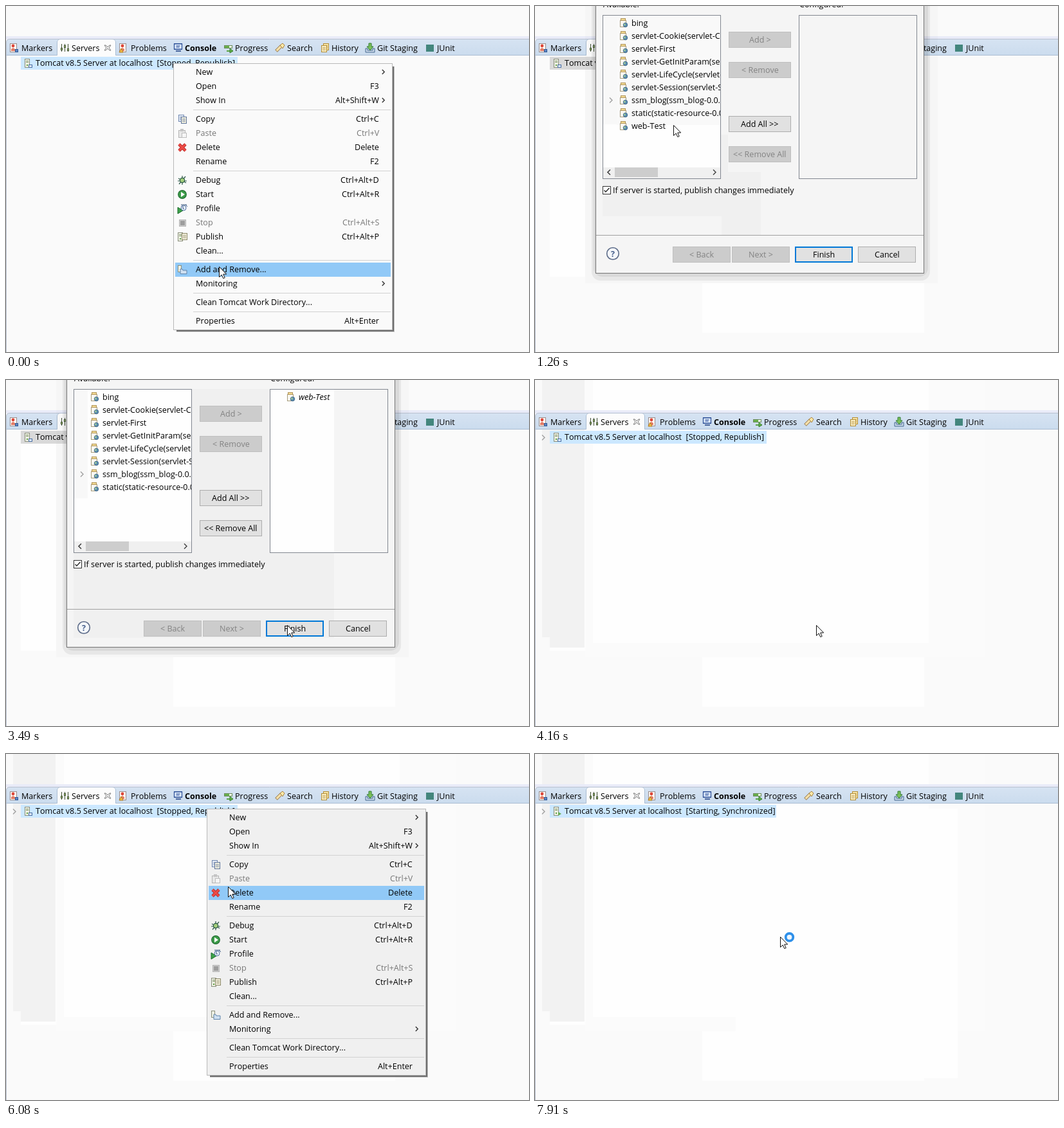
These frames come from a looping animation (813 px wide and 538 px high, 8 s). An HTML page with a canvas:

```html
<!DOCTYPE html>
<html lang="en">
<head>
<meta charset="utf-8">
<title>Server start demo</title>
<style>
html, body { margin: 0; height: 100%; overflow: hidden; background: #fafafa; }
canvas { display: block; }
</style>
</head>
<body>
<canvas id="stage" width="813" height="538"></canvas>
<script>
const ctx = document.getElementById('stage').getContext('2d');
const LOOP = 8000;
const FACE = '12.55px "Open Sans", "Noto Sans", sans-serif';
ctx.fontKerning = 'none';

// ---- drawing helpers ----
function rect(x, y, w, h, fill, stroke) {
  if (fill) { ctx.fillStyle = fill; ctx.fillRect(x, y, w, h); }
  if (stroke) { ctx.strokeStyle = stroke; ctx.lineWidth = 1; ctx.strokeRect(x + .5, y + .5, w - 1, h - 1); }
}
function path(d, x, y, fill, stroke, width = 1) {
  ctx.save();
  ctx.translate(x, y);
  const p = new Path2D(d);
  if (fill) { ctx.fillStyle = fill; ctx.fill(p); }
  if (stroke) { ctx.strokeStyle = stroke; ctx.lineWidth = width; ctx.stroke(p); }
  ctx.restore();
}
function disc(x, y, r, fill, stroke, width = 1) {
  ctx.beginPath();
  ctx.arc(x, y, r, 0, 7);
  if (fill) { ctx.fillStyle = fill; ctx.fill(); }
  if (stroke) { ctx.strokeStyle = stroke; ctx.lineWidth = width; ctx.stroke(); }
}
function text(s, x, midY, color = '#000', align = 'left', style = '') {
  ctx.font = style + ' ' + FACE;
  ctx.fillStyle = color;
  ctx.textAlign = align;
  const left = align === 'left' ? x : x - ctx.measureText(s).width / (align === 'center' ? 2 : 1);
  ctx.textAlign = 'left';
  ctx.fillText(s, Math.round(left), Math.floor(midY) + 5);
}
const chevron = (x, y, color = '#a0a0a0', s = 1) =>
  path(`M${-2 * s} ${-4 * s}L${2 * s} 0L${-2 * s} ${4 * s}`, x, y, null, color, 1.4);

// ---- icons, drawn around their centre ----
const page = (x, y, fill, edge) => {
  rect(x, y, 9, 11, fill, edge);
  path('M2 3.5H7M2 5.5H7M2 7.5H7', x, y, null, edge, .7);
};
const tower = (x, y) => {
  rect(x, y, 8, 14, '#eef0e4', '#8a8f7c');
  path('M2 3.5H6M2 5.5H6', x, y, null, '#7f9468');
  rect(x + 3, y + 9, 2, 2, '#5aa03c');
};
const marker = (x, y, badge) => {
  rect(x - 6, y - 7, 11, 14, '#fdfaf6', '#9c8c8a');
  disc(x - 1, y - 3, 2.4, '#dd4638');
  path('M-4 5V2L-1 0L2 2V5Z', x, y, '#e27c66');
  badge(x, y);
};
const icons = {
  markers: (x, y) => marker(x, y, () => rect(x + 2, y + 2, 5, 5, '#5d86c2', '#315a98')),
  problems: (x, y) => marker(x, y, () => path('M-6 7L-3 1L0 7Z', x, y, '#f6c04a', '#b07a1a')),
  servers: (x, y) => {
    path('M-4.5 -6V6M.5 -6V6M5.5 -6V6', x, y, null, '#3e4d33');
    for (const [dx, dy] of [[-6, 0], [-1, -4], [4, 1]]) rect(x + dx, y + dy, 3, 4, '#b9d67e', '#405332');
  },
  console: (x, y) => {
    rect(x - 6, y - 7, 13, 10, '#dce9fb', '#2b4e96');
    path('M-6 -6H6V2H-6ZM-3 -3H3M-3 -1H2', x + .5, y, null, '#2b4e96', 1.2);
    rect(x - 3, y + 4, 8, 2, '#47649c');
  },
  progress: (x, y) => {
    rect(x - 7, y - 4, 13, 5, '#eef6e6', '#6a8a5a');
    rect(x - 6, y - 3, 7, 3, '#69b04c');
    rect(x - 3, y + 4, 6, 2, '#5ca545');
    path('M2 1L7 5L2 8Z', x, y, '#63b24a', '#357b2c');
  },
  search: (x, y) => {
    path('M-6 5L2 -3', x, y, null, '#8f7140', 5);
    path('M-5.5 4.5L2 -3', x, y, null, '#f5dfa8', 3.4);
    path('M0 -4L4 -7L7 -4L4 1Z', x, y, '#fbe9a8', '#a9813c');
  },
  history: (x, y) => {
    page(x - 2, y - 7, '#f8e6ab', '#b38d33');
    page(x - 5, y - 4, '#fbf0c8', '#b38d33');
  },
  git: (x, y) => {
    path('M-7 1V7H7V1H4V4H-4V1Z', x, y, '#c9d7e8', '#44688f');
    path('M-2 -7H2V-2H5L0 4L-5 -2H-2Z', x, y, '#7cc05a', '#2f7a33');
  },
  junit: (x, y) => rect(x - 6, y - 5, 12, 11, '#43867d'),
  copy: (x, y) => { page(x - 6, y - 7, '#e8eef8', '#6f87b0'); page(x - 2, y - 4, '#f6f3e0', '#5c7299'); },
  paste: (x, y) => {
    rect(x - 6, y - 5, 11, 12, '#e8e8e8', '#b5b5b5');
    rect(x - 3, y - 7, 5, 4, '#c4c4c4');
    rect(x - 1, y - 1, 8, 8, '#f6f6f6', '#bdbdbd');
  },
  remove: (x, y) => {
    path('M-5 -5L5 5M5 -5L-5 5', x, y, null, '#b62a2a', 4.6);
    path('M-5 -5L5 5M5 -5L-5 5', x, y, null, '#ee4b45', 3);
  },
  debug: (x, y) => {
    path('M-6 -3L6 4M-7 1H7M-5 6L5 -6M0 -7V7', x, y, null, '#2f5a48', 1.2);
    disc(x, y, 3.6, '#a5cf7c', '#2c5c48', 1.3);
  },
  start: (x, y) => {
    disc(x, y, 6.3, '#3c9c48', '#247035', 1.2);
    path('M-2 -4L4 0L-2 4Z', x, y, '#fff');
  },
  profile: (x, y) => {
    path('M-7 -2L1 3L-7 8Z', x, y, '#3da24a', '#1c6b2c');
    disc(x + 2, y - 1, 4, '#eaf2fc', '#4d6d9c');
    path('M0 -4V0H2M-3 -6H6M4 -6L7 -3', x + 1, y, null, '#38567f');
  },
  stop: (x, y) => { rect(x - 5, y - 5, 11, 11, '#d0d0d0', '#b4b4b4'); rect(x - 3, y - 3, 7, 7, '#9d9d9d'); },
  publish: (x, y) => { tower(x - 7, y - 7); page(x - 1, y - 6, '#f4f0dc', '#8b8868'); },
  modules: (x, y) => {
    rect(x - 7, y - 7, 6, 11, '#eef0e4', '#8a8f7c');
    path('M-3 -1H0L1 1H7V6.5H-3Z', x, y, '#cfe0f2', '#5f83aa');
  },
  jar: (x, y) => {
    rect(x - 5, y - 4, 10, 11, '#fbf9f2', '#a59a7a');
    rect(x - 4, y - 7, 8, 4, '#f3dc94', '#b0935a');
    disc(x + 3.5, y + 3.5, 3.2, '#5a8db0', '#41698c');
    path('M1 2Q3 0 4 3L2 5Z', x, y, '#a6d096');
  }
};

// ---- timeline ----
// Bursts of screen updates: start, end, number of steps.
const bursts = [[150, 1140, 8], [1260, 2200, 8], [2320, 3340, 9], [3490, 4400, 8],
  [4700, 5480, 7], [5790, 6350, 5], [6630, 6750, 2], [7220, 7500, 3], [7910, 7910, 1]];
const pointer = [[0, 331, 405], [560, 331, 405], [1140, 218, 200], [1260, 215, 185], [1530, 215, 185],
  [1930, 272, 112], [2066, 308, 79], [2200, 338, 50], [2700, 338, 50], [3340, 437, 381],
  [4600, 437, 381], [5220, 314, 96], [5480, 312, 85], [5790, 312, 85], [6350, 378, 327],
  [6620, 378, 327], [6630, 380, 306], [6750, 381, 284], [LOOP, 381, 284]];

function snap(t) {
  const burst = bursts.filter(b => b[0] <= t).pop();
  if (!burst) return 0;
  const [from, to, steps] = burst;
  const gap = (to - from) / Math.max(1, steps - 1);
  return gap ? Math.min(to, from + Math.floor((t - from + 12) / gap) * gap) : from;
}
function pointerAt(t) {
  const i = Math.max(1, pointer.findIndex(p => p[0] >= t));
  const [t0, x0, y0] = pointer[i - 1], [t1, x1, y1] = pointer[i];
  const k = (t - t0) / (t1 - t0);
  return [Math.round(x0 + (x1 - x0) * k), Math.round(y0 + (y1 - y0) * k)];
}

// ---- workbench ----
const tabs = [['Markers', 'markers', 12, 24], ['Servers', 'servers', 91, 102], ['Problems', 'problems', 182, 194],
  ['Console', 'console', 267, 278], ['Progress', 'progress', 346, 356], ['Search', 'search', 426, 437],
  ['History', 'history', 495, 506], ['Git Staging', 'git', 566, 577], ['JUnit', 'junit', 659, 670]];

function workbench(t, inDialog) {
  rect(0, 0, 813, 538, '#fafafa');
  if (t >= 570) {
    rect(260, 431, 345, 77, '#fefefe');
    rect(23, 99, 55, 322, '#fefefe');
  }
  if (t >= 3870) {
    rect(78, 0, 621, 431, '#fbfbfb');
    rect(90, 0, 522, 409, '#fefefe');
    rect(11, 0, 66, 400, '#f2f2f2');
    rect(23, 77, 54, 339, '#f2f2f2');
  }
  if (t >= 7220) rect(312, 85, 345, 419, '#fefefe');

  rect(0, 47, 813, 5, '#e9ebf8');
  const bar = ctx.createLinearGradient(0, 52, 0, 76);
  bar.addColorStop(0, '#d6e3f2');
  bar.addColorStop(1, '#cbdcee');
  path('M0 77V57Q0 51.5 6 51.5H813V77Z', 0, 0, bar);
  path('M.5 538V57Q.5 51.5 6 51.5H813', 0, 0, null, '#b9c1cf');
  path('M0 76.5H79.5V57Q79.5 52 85 52H165Q170.5 52 170.5 57V76.5H813', 0, 0, null, '#aabdd3');
  path('M80 78V57Q80 52 85 52H165Q170 52 170 57V78Z', 0, 0, '#fcfcfc');
  for (const [name, icon, iconX, x] of tabs) {
    icons[icon](iconX, 65);
    text(name, x, 65, '#000', 'left', name === 'Console' ? 'bold' : '');
  }
  path('M-5 -4L-3 -4L0 -1L3 -4L5 -4L2 0L5 4L3 4L0 1L-3 4L-5 4L-2 0Z', 158, 65, '#fff', '#757575');

  const starting = t >= 7910;
  rect(23, 79, starting ? 352 : 337, 20, inDialog ? '#d9d9d9' : '#cce8ff');
  tower(29, 82);
  if (starting) path('M0 0L5 3L0 6Z', 36, 90, '#62ad50');
  else rect(35, 91, 6, 5, '#dbe7f7', '#4a6ea3');
  text('Tomcat v8.5 Server at localhost  [' + (starting ? 'Starting, Synchronized]' : 'Stopped, Republish]'), 46, 88);
  if (t >= 4000) chevron(13, 89.5);
}

// ---- context menu; null is a separator ----
const menuItems = [['New', '>'], ['Open', 'F3'], ['Show In', 'Alt+Shift+W>'], null,
  ['Copy', 'Ctrl+C', 'copy'], ['Paste', 'Ctrl+V', 'paste', true], ['Delete', 'Delete', 'remove'], ['Rename', 'F2'], null,
  ['Debug', 'Ctrl+Alt+D', 'debug'], ['Start', 'Ctrl+Alt+R', 'start'], ['Profile', '', 'profile'],
  ['Stop', 'Ctrl+Alt+S', 'stop', true], ['Publish', 'Ctrl+Alt+P', 'publish'], ['Clean...', ''], null,
  ['Add and Remove...', '', 'modules'], ['Monitoring', '>'], null,
  ['Clean Tomcat Work Directory...', ''], null, ['Properties', 'Alt+Enter']];

function menu(x, y, fill, [px, py]) {
  rect(x + 5, y + 5, 339, 413, '#00000038');
  rect(x + 5, y + 5, 338, 412, '#00000070');
  rect(x, y, 341, 415, fill, '#b8b8b8');
  let top = y + 2;
  for (const item of menuItems) {
    if (!item) {
      rect(x + 31, top + 4, 307, 1, '#d2d2d2');
      top += 7;
      continue;
    }
    const [label, keys, icon, disabled] = item;
    const mid = top + 11, color = disabled ? '#777' : '#000';
    if (px > x + 2 && py > top && py <= top + 22) rect(x + 3, top + 1, 335, 22, '#91c9f7');
    if (icon) icons[icon](x + 14, mid + 1);
    text(label, x + 35, mid, color);
    text(keys.replace('>', ''), x + 320, mid, color, 'right');
    if (keys.endsWith('>')) chevron(x + 326.5, mid + .5, '#333', .85);
    top += 22;
  }
}

// ---- dialog ----
function button(label, x, y, w, enabled, focus) {
  rect(x, y, w, 25, enabled ? '#e1e1e1' : '#ccc', enabled ? '#adadad' : '#bfbfbf');
  if (focus) path(`M1 1H${w - 1}V24H1Z`, x, y, null, '#0078d7', 2);
  text(label, x + w / 2, y + 12.5, enabled ? '#000' : '#838383', 'center');
}
const snapshot = name => `${name}(${name}-0.0.1-SNAPSHOT)`;
const projects = ['bing', snapshot('servlet-Cookie'), 'servlet-First', snapshot('servlet-GetInitParam'),
  snapshot('servlet-LifeCycle'), snapshot('servlet-Session'), snapshot('ssm_blog'),
  'static(static-resource-0.0.1-SNAPSHOT)', 'web-Test'];

function dialog(t, alpha) {
  const selected = t >= 1390 && t < 2440, moved = t >= 2440;
  ctx.save();
  ctx.globalAlpha = alpha;
  rect(78, 0, 548, 431, '#00000004');
  for (const inset of [0, 3]) {
    ctx.beginPath();
    ctx.roundRect(88 + inset, -20, 526 - 2 * inset, 447 - 2 * inset, 14);
    ctx.fillStyle = '#00000010';
    ctx.fill();
  }
  rect(94, -5, 511, 421, '#f5f5f5', '#747474');
  if (moved) rect(105, 14, 405, 387, '#f0f0f0');
  else {
    rect(105, 200, 195, 127, '#f0f0f0');
    rect(290, 258, 61, 98, '#f0f0f0');
    if (selected) rect(289, 40, 165, 140, '#f0f0f0');
  }
  text('Available:', 106, -3);
  text('Configured:', 411, -3);
  rect(105, 14, 184, 255, '#fefefe', '#828790');
  rect(106, 15, 21, 169, '#f8f8f8');
  if (t < 1390) rect(127, 15, 161, 170, '#f9f9f9');
  rect(410, 14, 184, 255, '#f5f5f5', '#828790');
  if (moved) rect(411, 15, 99, 253, '#fefefe');
  else if (selected) rect(411, 40, 43, 140, '#fefefe');
  rect(106, 251, 182, 17, '#f0f0f0');
  rect(124, 251, 67, 15, '#cdcdcd');
  path('M2 -4L-2 0L2 4', 115, 258.5, null, '#404040', 1.6);
  chevron(279, 258.5, '#404040');

  button('Add >', 301, 40, 97, selected);
  button('< Remove', 301, 87, 97, false);
  button('Add All >>', 301, 171, 97, true);
  button('<< Remove All', 301, 218, 97, moved);
  rect(105, 280, 13, 13, '#fff', '#333');
  path('M2.5 6.5L5 9L10.5 3', 105, 280, null, '#222', 1.3);
  text('If server is started, publish changes immediately', 121, 286.5);
  rect(95, 356, 509, 1, '#a0a0a0');
  disc(121, 385, 9.3, '#f4f7fb', '#5c6b88', 1.6);
  text('?', 121, 385, '#465f8c', 'center', 'bold');
  button('< Back', 214, 374, 90, false);
  button('Next >', 306, 374, 90, false);
  button('Finish', 404, 374, 90, true, true);
  button('Cancel', 502, 374, 90, true);

  if (t >= 1920 && t < 2190) {
    ctx.save();
    ctx.shadowColor = '#0006';
    ctx.shadowBlur = 3;
    ctx.shadowOffsetX = ctx.shadowOffsetY = 2;
    rect(127, 96, 323, 20, '#fff');
    ctx.restore();
    rect(127, 96, 323, 20, null, '#767676');
    text(projects[4], 150, 106, '#575757');
  }
  ctx.save();
  ctx.beginPath();
  ctx.rect(106, 15, 182, 236);
  ctx.clip();
  if (selected) rect(127, 176, 80, 20, '#cce8ff');
  projects.slice(0, moved ? 8 : 9).forEach((name, i) => {
    icons.jar(137, 26 + 20 * i);
    text(name, 150, 26 + 20 * i);
  });
  chevron(118, 146.5);
  ctx.restore();
  if (moved) {
    icons.jar(442, 26);
    text('web-Test', 455, 26, '#000', 'left', 'italic');
  }
  ctx.restore();
}

function cursor([x, y], busy) {
  path('M.5 .5V16.5L4.2 13L6.8 18.6L9.2 17.5L6.7 12H11.7Z', x, y, '#fff', '#111');
  if (busy) disc(x + 14.5, y + .8, 5.8, '#eef7ff', '#2e90ea', 3.8);
}

function draw(now) {
  const t = snap(now % LOOP), at = pointerAt(t);
  const dialogAlpha = t < 420 || t >= 3870 ? 0 : t < 560 || t >= 3740 ? .5 : 1;
  workbench(t, dialogAlpha > 0);
  if (t < 150) menu(260, 89, '#fafafa', at);
  if (dialogAlpha) dialog(t, dialogAlpha);
  if (t >= 5790 && t < 7220) menu(312, 85, '#f0f0f0', at);
  cursor(at, t >= 7220);
}

(function tick() {
  draw(performance.now());
  requestAnimationFrame(tick);
})();
</script>
</body>
</html>
```
